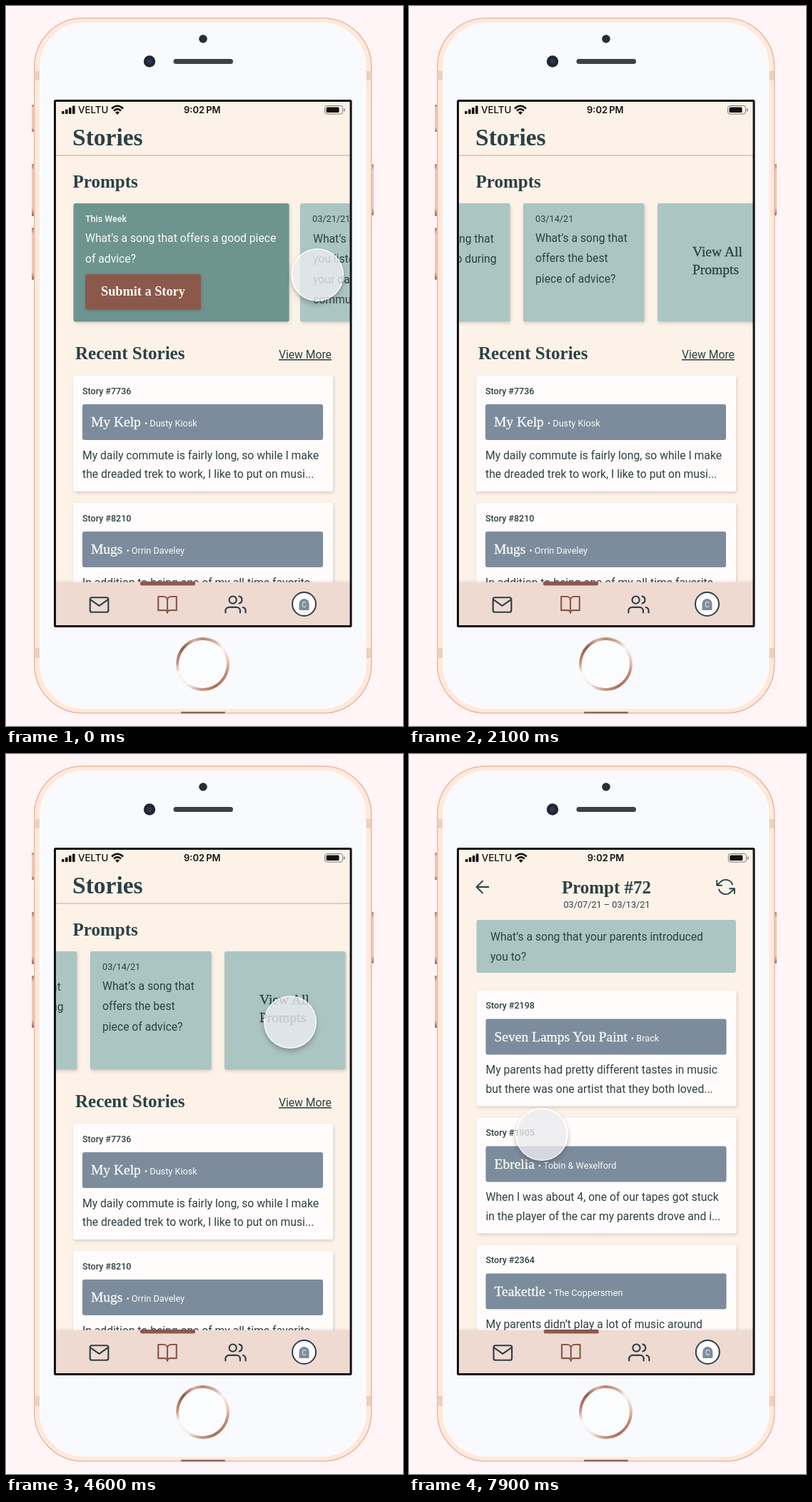
These frames come from a looping animation (556 by 1007 pixels, 8000 ms). An HTML page:

```html
<!DOCTYPE html>
<html lang="en">
<head>
<meta charset="utf-8">
<title>Stories app</title>
<style>
  html, body { margin: 0; width: 100%; height: 100%; overflow: hidden; background: #fff5f6; }
  svg { position: absolute; left: 0; top: 0; display: block; }
  text { fill: #2c4144; font: 15.7px Roboto, sans-serif; }
  .small { font-size: 12.5px; font-weight: 500; }
  .date { font-size: 12.7px; }
  .artist { font: 12.7px Roboto, sans-serif; stroke: none; }
  .title { font: bold 25px "Liberation Serif", serif; }
  .big { font-size: 33.5px; }
  .button { font: bold 18.3px "Liberation Serif", serif; fill: #fffaf5; }
  .serif { font: 19.5px "Liberation Serif", serif; stroke: #2c4144; stroke-width: .3px; }
  .serif.light { stroke: #f8faf7; }
  .mid { text-anchor: middle; }
  .light, .light tspan { fill: #f8faf7; }
  .link { text-decoration: underline 1px; text-underline-offset: 2px; }
  .carrier { font: 500 13.3px Inter, sans-serif; fill: #111; }
  .clock { font: 600 13px Inter, sans-serif; fill: #111; }
  .card { filter: drop-shadow(1px 2px 2px rgba(90, 70, 60, .22)); }
  .icon { fill: none; stroke: #2c4144; stroke-width: 1.7; stroke-linecap: round; stroke-linejoin: round; }
  .active { stroke: #8b584c; }

  .ring {
    position: absolute; left: 238px; top: 883px; width: 75px; height: 75px; border-radius: 50%;
    background:
      radial-gradient(circle, #fbfcfe 33px, transparent 33.8px),
      conic-gradient(#b9826d, #d9b3a3 30deg, #fbf5f2 50deg, #e9cabd 80deg, #c08c78 110deg, #a9705b 150deg,
        #c9998a 185deg, #f8ece6 215deg, #fbf8f7 250deg, #c39480 275deg, #8f5b49 310deg, #d8b3a5 340deg, #b9826d);
  }

  .strip, .past, .detail, .touch { animation: 8s linear infinite; }
  .strip { animation-name: swipe; }
  .past { animation-name: showPast; }
  .detail { animation-name: showDetail; }
  .touch {
    position: absolute; left: -37px; top: -37px; width: 70px; height: 70px;
    border: 2px solid rgba(255, 255, 255, .85); border-radius: 50%;
    background-clip: padding-box;
    animation-name: move, press, fade;
  }
  @keyframes swipe {
    0%, 12.5% { transform: translateX(0); animation-timing-function: cubic-bezier(.45, 0, .8, .7); }
    18.75% { transform: translateX(-116px); animation-timing-function: cubic-bezier(.2, .4, .5, 1); }
    31.25% { transform: translateX(-493px); animation-timing-function: ease-in-out; }
    33.75% { transform: translateX(-491px); animation-timing-function: ease-out; }
    39%, 100% { transform: translateX(-482px); }
  }
  @keyframes showPast { 0%, 62.5% { opacity: 0; } 66.25%, 100% { opacity: 1; } }
  @keyframes showDetail { 0%, 85% { opacity: 0; } 88.75%, 100% { opacity: 1; } }
  @keyframes move {
    0%, 11.25% { transform: translate(436px, 376px); animation-timing-function: ease-in-out; }
    18.75% { transform: translate(304px, 364px); animation-timing-function: ease-out; }
    22.5% { transform: translate(285px, 364px); }
    30%, 45% { transform: translate(325px, 364px); animation-timing-function: ease-in-out; }
    53.75%, 67.5% { transform: translate(398px, 375px); animation-timing-function: ease-in; }
    73.75% { transform: translate(307px, 573px); animation-timing-function: ease-out; }
    80%, 100% { transform: translate(186px, 532px); }
  }
  @keyframes press {
    0%, 11.25%, 41.25%, 60%, 64.5%, 82.5%, 87%, 100% {
      background-color: rgba(235, 236, 240, .8); box-shadow: 0 4px 6px rgba(60, 60, 70, .35);
    }
    13.75%, 37.5%, 62%, 84.5% {
      background-color: rgba(245, 247, 247, .42); box-shadow: 0 1px 2px rgba(60, 60, 70, 0);
    }
  }
  @keyframes fade {
    0%, 18.75%, 41.25%, 100% { opacity: 1; }
    22.5%, 37.5% { opacity: 0; }
  }
</style>
</head>
<body>
<svg id="stage" width="556" height="1007" viewBox="0 0 556 1007"></svg>
<div class="ring"></div>
<div class="touch"></div>
<script>
const rect = (x, y, w, h, fill, r = 0, extra = '') =>
  `<rect x="${x}" y="${y}" width="${w}" height="${h}" rx="${r}" fill="${fill}" ${extra}/>`;
const text = (x, y, str, cls = '') => `<text x="${x}" y="${y}" class="${cls}">${str}</text>`;
const lines = (x, y, gap, list, cls) => list.map((s, i) => text(x, y + i * gap, s, cls)).join('');
const card = (x, y, w, h, fill) => rect(x, y, w, h, fill, 3, 'class="card"');
// Icons sit on a 24-unit grid, centred on (x, y).
const icon = (x, y, scale, d, cls = '') =>
  `<path class="icon ${cls}" transform="translate(${x} ${y}) scale(${scale}) translate(-12 -12)" d="${d}"/>`;

const CREAM = '#fcf2e8', TEAL = '#6d948e', MINT = '#abc5c2', SLATE = '#7c8c9d', BROWN = '#8b584c';
const ICONS = {
  mail: 'M4 4h16a2 2 0 0 1 2 2v12a2 2 0 0 1-2 2H4a2 2 0 0 1-2-2V6a2 2 0 0 1 2-2zM22 6l-10 7L2 6',
  book: 'M2 3h6a4 4 0 0 1 4 4v14a3 3 0 0 0-3-3H2zM22 3h-6a4 4 0 0 0-4 4v14a3 3 0 0 1 3-3h7z',
  users: 'M17 21v-2a4 4 0 0 0-4-4H5a4 4 0 0 0-4 4v2M5 7a4 4 0 1 0 8 0a4 4 0 1 0-8 0M23 21v-2a4 4 0 0 0-3-3.87M16 3.13a4 4 0 0 1 0 7.75',
  back: 'M19 12H5M12 19l-7-7 7-7',
  calendar: 'M5 4h14a2 2 0 0 1 2 2v14a2 2 0 0 1-2 2H5a2 2 0 0 1-2-2V6a2 2 0 0 1 2-2zM16 2v4M8 2v4M3 10h18',
  refresh: 'M1 4v6h6M23 20v-6h-6M20.49 9A9 9 0 0 0 5.64 5.64L1 10m22 4l-4.64 4.36A9 9 0 0 1 3.51 15'
};

const statusBar = () =>
  [4, 6.5, 9, 11.5].map((h, i) => rect(78 + i * 5, 151 - h, 3.6, h, '#111', 1)).join('') +
  text(101, 150, 'VELTU', 'carrier') +
  `<g fill="none" stroke="#111" stroke-width="2.6"><path d="M148 143.5q8-7.5 16 0M151 146.5q5-4.6 10 0"/></g>
   <path d="M153 148.8q3-2.4 6 0l-3 3.2z" fill="#111"/>` +
  '<text x="249" y="150" class="clock">9:02<tspan dx="2">PM</tspan></text>' +
  rect(446.5, 139.5, 25, 11.5, 'none', 3, 'stroke="#777"') +
  rect(448.5, 141.5, 18, 7.5, '#111', 1.5) + rect(473, 143.5, 1.6, 4, '#777', 1);

const navBar = () =>
  rect(69, 806, 414, 62, '#efdad2', 0, 'style="filter:drop-shadow(0 -1px 2px rgba(120,90,80,.15))"') +
  rect(188, 805, 77, 5.5, BROWN, 2) +
  icon(130.5, 837.5, 1.28, ICONS.mail) + icon(226, 837.5, 1.28, ICONS.book, 'active') +
  icon(321.5, 837, 1.28, ICONS.users) +
  '<circle cx="417.5" cy="836.5" r="16.5" fill="#fffcfb" stroke="#2c4144" stroke-width="2"/>' +
  `<path d="M410.5 844v-8a7 7 0 0 1 14 0v8q0 1-1 1h-12q-1 0-1-1z" fill="${SLATE}"/>` +
  '<text x="417.5" y="841" class="mid light" style="font-size:10px">C</text>';

const story = (x, y, id, song, artist, body) =>
  card(x, y, 364, 162, '#fffcfb') + text(x + 13, y + 25.5, 'Story #' + id, 'small') +
  rect(x + 13, y + 40, 337, 50, SLATE, 3) +
  `<text x="${x + 25}" y="${y + 71}" class="serif light">${song}<tspan class="artist" dx="5">• ${artist}</tspan></text>` +
  lines(x + 13, y + 116.5, 26.5, body);

const prompt = (x, y, w, date, body, textX = 17, textY = 53.5) =>
  card(x, y, w, 165.5, MINT) + text(x + 17, y + 26, date, 'date') +
  lines(x + textX, y + textY, 28.6, body);

const ASK = 'What’s a song that';
const COMMUTE = [ASK, 'you listen to during', 'your daily', 'commute?'];
const ADVICE = [ASK, 'offers the best', 'piece of advice?'];

const home = () => rect(69, 133, 414, 735, CREAM) + statusBar() +
  text(93, 195, 'Stories', 'title big') + rect(69, 208, 414, 2, '#eec7ba') +
  text(93.5, 253.5, 'Prompts', 'title') +
  '<g class="strip">' +
    card(94.5, 276, 302, 165.5, TEAL) + text(111, 302, 'This Week', 'small light') +
    lines(111, 330, 28.5, ['What’s a song that offers a good piece', 'of advice?'], 'light') +
    card(111, 375, 162, 50, BROWN) + text(133, 404.5, 'Submit a Story', 'button') +
    prompt(412, 276, 169.5, '03/21/21', COMMUTE, 18, 54.5) +
    prompt(600, 276, 169.5, '03/14/21', ADVICE) +
    card(788, 276, 169.5, 165.5, MINT) + lines(837, 350, 24.5, ['View All', 'Prompts'], 'serif') +
  '</g>' +
  text(97, 493.5, 'Recent Stories', 'title') + text(382, 493, 'View More', 'link') +
  story(94, 517, '7736', 'My Kelp', 'Dusty Kiosk',
    ['My daily commute is fairly long, so while I make', 'the dreaded trek to work, I like to put on musi...']) +
  story(94, 695, '8210', 'Mugs', 'Orrin Daveley', ['In addition to being one of my all-time favorite']) +
  navBar();

const pastPrompts = [
  ['03/21/21', COMMUTE], ['03/14/21', ADVICE],
  ['03/07/21', [ASK, 'your parents', 'introduced you to?']], ['02/28/21', [ASK, 'gets you through', 'hard times?']],
  ['02/21/21', [ASK, 'you wake up to in', 'the morning?']],
  ['02/14/21', [ASK, 'reminds you of a', 'loss that you’ve', 'experienced?']],
  ['03/07/21', [ASK, 'makes you want to']], ['01/31/21', [ASK, 'you wish you had']]
];

const past = () => rect(69, 133, 414, 735, CREAM) + `<g transform="translate(.8 0)">${statusBar()}</g>` +
  icon(103, 186, 1.2, ICONS.back) + text(275, 194.5, 'Past Prompts', 'title mid') +
  icon(445, 186, 1.2, ICONS.calendar) +
  pastPrompts.map(([date, body], i) => {
    const right = i % 2;
    return prompt(right ? 285.5 : 95.5, 232 + 182.4 * (i >> 1), 171.5, date, body, right ? 17 : 18, right ? 53.5 : 54.5);
  }).join('');

const detail = () => rect(69, 133, 414, 735, CREAM) + `<g transform="translate(.8 0)">${statusBar()}</g>` +
  icon(103, 186, 1.2, ICONS.back) + text(276.5, 195, 'Prompt #72', 'title mid') +
  icon(443.5, 186, 1.12, ICONS.refresh) + text(277, 215, '03/07/21 – 03/13/21', 'date mid') +
  rect(94.5, 232, 363.5, 74, MINT, 3) +
  lines(114, 260.5, 28.5, ['What’s a song that your parents introduced', 'you to?']) +
  story(94.5, 330.5, '2198', 'Seven Lamps You Paint', 'Brack',
    ['My parents had pretty different tastes in music', 'but there was one artist that they both loved...']) +
  story(94.5, 508.5, '1905', 'Ebrelia', 'Tobin &amp; Wexelford',
    ['When I was about 4, one of our tapes got stuck', 'in the player of the car my parents drove and i...']) +
  story(94.5, 686.5, '2364', 'Teakettle', 'The Coppersmen', ['My parents didn’t play a lot of music around']) +
  `<g transform="translate(.8 0)">${navBar()}</g>`;

const sideButton = (x, y, h) => rect(x, y, 5, h, 'url(#metal)', 2);
const phone = () =>
  sideButton(36, 138, 38) + sideButton(36, 221, 73) + sideButton(36, 310, 73) + sideButton(510, 221, 72) +
  rect(39.75, 17, 472, 972, '#fde9de', 68, 'stroke="#e9bda7" stroke-width="1.6"') +
  [40, 503].map(x => rect(x, 91, 8, 13, '#efcfbf') + rect(x, 898, 8, 14, '#efcfbf')).join('') +
  rect(48.5, 24.5, 454.5, 957, '#f8fafd', 61, 'stroke="#fffaf7" stroke-width="3"') +
  rect(245, 987, 62, 2.5, '#8d6a5c', 1) +
  '<circle cx="276" cy="46" r="5.8" fill="#2c2d31"/>' +
  '<circle cx="201" cy="77.5" r="8.2" fill="#23252b"/><circle cx="201" cy="77.5" r="3.6" fill="#27345f"/>' +
  rect(234.5, 74, 83.5, 7, '#3e4044', 3.5);

document.getElementById('stage').innerHTML = `
  <defs>
    <clipPath id="screen">${rect(69, 133, 414, 735, '#000')}</clipPath>
    <linearGradient id="metal" x2="0" y2="1">
      <stop offset="0" stop-color="#a87561"/><stop offset=".12" stop-color="#eec9b8"/>
      <stop offset=".85" stop-color="#eec9b8"/><stop offset="1" stop-color="#93604d"/>
    </linearGradient>
  </defs>
  ${phone()}
  <g clip-path="url(#screen)">
    <g>${home()}</g><g class="past">${past()}</g><g class="detail">${detail()}</g>
  </g>
  ${rect(68.5, 132.5, 414.5, 735, 'none', 1, 'stroke="#111" stroke-width="3"')}`;
</script>
</body>
</html>
```
